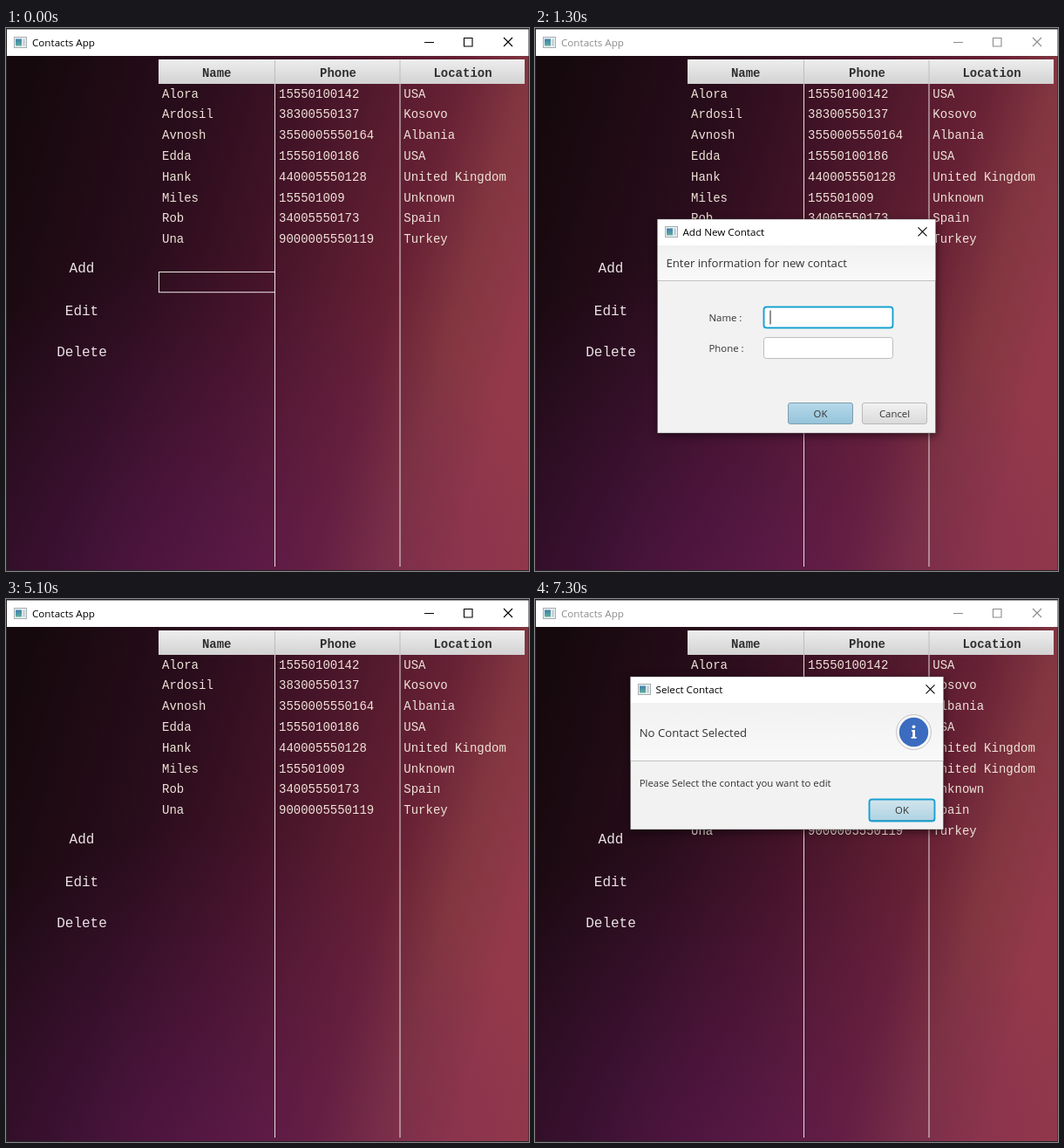
Recreate the animation shown at these times as an HTML page. Size 600 by 622 pixels, loop 8 s.

```html
<!DOCTYPE html>
<html lang="en">
<head>
<meta charset="utf-8">
<title>Contacts App</title>
<style>
  html, body { margin: 0; width: 100%; height: 100%; overflow: hidden; background: #222; }
  svg { display: block; width: 600px; height: 622px; }
  text { white-space: pre; }
  .mono { font: 14px "Liberation Mono", monospace; fill: #eee2d8; }
  .head { font-weight: bold; fill: #2f2f2f; text-anchor: middle; }
  .menu { font-size: 16px; fill: #e9e1e4; text-anchor: middle; }
  .ui { font: 11.4px "Open Sans", "Noto Sans", sans-serif; fill: #333; }
  .title { font-size: 11.65px; fill: currentColor; }
  .big { font-size: 13.15px; }
  .mid { text-anchor: middle; }
  .line { fill: none; stroke: currentColor; stroke-width: 1.1; }
  .dialog { color: #000; filter: drop-shadow(1px 3px 5px rgba(0, 0, 0, .5)); }
</style>
</head>
<body>
<svg id="stage" viewBox="0 0 600 622" xmlns="http://www.w3.org/2000/svg"></svg>
<script>
const LOOP = 8000;
const ROW = 23.83;
const NEW_NAME = "Fiona", NEW_PHONE = "440005550191";

const contacts = [
  ["Alora", "15550100142", "USA"],
  ["Ardosil", "38300550137", "Kosovo"],
  ["Avnosh", "3550005550164", "Albania"],
  ["Edda", "15550100186", "USA"],
  ["Hank", "440005550128", "United Kingdom"],
  ["Miles", "155501009", "Unknown"],
  ["Rob", "34005550173", "Spain"],
  ["Una", "9000005550119", "Turkey"]
];
const extended = [...contacts];
extended.splice(4, 0, [NEW_NAME, NEW_PHONE, "United Kingdom"]);

const text = (x, y, cls, content, id = "") =>
  `<text x="${x}" y="${y}" class="${cls}" id="${id}">${content}</text>`;
const rect = (x, y, w, h, attrs) =>
  `<rect x="${x}" y="${y}" width="${w}" height="${h}" ${attrs}/>`;
const gradient = (id, stops, attrs = 'x2="0" y2="1"') =>
  `<linearGradient id="${id}" ${attrs}>${stops.map(([o, c]) =>
    `<stop offset="${o}" stop-color="${c}"/>`).join("")}</linearGradient>`;

const windowIcon = (x, y) => `<g transform="translate(${x} ${y})">
  ${rect(.5, .5, 14, 12, 'fill="#eef2f3" stroke="#a3adb2"')}
  ${rect(2, 2.5, 7, 8, 'fill="url(#iconFill)"')}
  ${rect(10, 2.5, 3, 8, 'fill="#c9d3d8"')}</g>`;

const cross = (x, y) => `<path class="line" d="M${x - 5} ${y - 5}l10 10m0 -10l-10 10"/>`;

const table = rows => rows.map((row, i) =>
  row.map((cell, c) => text([179, 313, 456.3][c], 79.5 + ROW * i, "mono", cell)).join("")).join("");

const button = (x, y, w, label, fill, stroke) =>
  rect(x + .5, y + .5, w - 1, 24, `rx="2.5" fill="url(#${fill})" stroke="${stroke}"`) +
  text(x + w / 2, y + 17, "ui mid", label);

const ring = (id, x, y, w, h) =>
  `<g id="${id}" fill="none">${rect(x - .5, y - .5, w + 1, h + 1, 'rx="4" stroke="#9fd6ec" stroke-opacity=".6"')}
  ${rect(x + .6, y + .6, w - 1.2, h - 1.2, 'rx="3" stroke="#12a0d0" stroke-width="1.7"')}</g>`;

const field = (name, y) =>
  rect(262.5, y + .5, 148, 24, 'rx="3" fill="#fff" stroke="#bcbcbc"') +
  ring(name + "Ring", 262, y, 149, 25) +
  text(270, y + 17, "ui", "", name + "Text") +
  rect(269.5, y + 4.5, 1, 16, `id="${name}Caret" fill="#222"`);

const dialog = (id, x, y, w, h, headHeight, title, content) => `<g id="${id}" class="dialog">
  ${rect(x, y, w, h, 'fill="#f2f2f2"')}
  ${rect(x, y, w, 30, 'fill="#fff"')}
  ${rect(x, y + 30, w, headHeight, 'fill="url(#panel)"')}
  ${rect(x, y + 30 + headHeight, w, 1, 'fill="#c2c2c2"')}
  ${rect(x, y, w, h, 'fill="none" stroke="#555" stroke-opacity=".5" stroke-width=".8"')}
  ${windowIcon(x + 8.5, y + 8)}${text(x + 29, y + 19, "ui title", title)}
  ${cross(x + w - 15, y + 14.3)}${content}</g>`;

const stage = document.getElementById("stage");
stage.innerHTML = `<defs>
  ${gradient("wall", [[0, "#16090d"], [.3, "#2a0d1c"], [.5, "#431327"], [.75, "#672135"],
    [.87, "#823640"], [1, "#94394a"]], 'gradientUnits="userSpaceOnUse" x1="0" y1="150" x2="600" y2="330"')}
  <radialGradient id="glow" gradientUnits="userSpaceOnUse" cx="230" cy="680" r="420">
    <stop offset="0" stop-color="#5f195f" stop-opacity=".55"/>
    <stop offset="1" stop-color="#5f195f" stop-opacity="0"/>
  </radialGradient>
  ${gradient("header", [[0, "#eeeeee"], [1, "#d2d2d2"]])}
  ${gradient("panel", [[0, "#f1f1f1"], [1, "#f9f9f9"]])}
  ${gradient("plain", [[0, "#f2f2f2"], [1, "#dadada"]])}
  ${gradient("primary", [[0, "#b5d9ea"], [1, "#96c3d9"]])}
  ${gradient("focused", [[0, "#d3e5ec"], [1, "#afd3e3"]])}
  ${gradient("iconFill", [[0, "#3f7fae"], [1, "#5fae9c"]])}
</defs>
${rect(0, 0, 600, 622, 'fill="#262226"')}
${rect(1, 32, 598.5, 589, 'fill="url(#wall)"')}
${rect(1, 32, 598.5, 589, 'fill="url(#glow)"')}
<g id="titleBar">
  ${rect(1, 1.5, 598.5, 30.5, 'fill="#fff"')}
  ${windowIcon(9, 10)}${text(30, 21, "ui title", "Contacts App")}
  <path class="line" d="M480 16.5h11M525.5 11.5h9.5v9.5h-9.5z"/>${cross(576, 16)}
</g>
${["Add", "Edit", "Delete"].map((label, i) => text(87, [279.5, 328.5, 375.5][i], "mono menu", label)).join("")}
${rect(175, 36, 420, 28, 'fill="url(#header)"')}
${["Name", "Phone", "Location"].map((label, i) => text([241.7, 381, 524][i], 55.5, "mono head", label)).join("")}
${[308, 451.5].map(x => rect(x, 37, 1, 27, 'fill="#bdbdbd"') + rect(x, 64, 1, 553, 'fill="#e6dde0"')).join("")}
<g id="rowsBefore">${table(contacts)}</g>
<g id="rowsAfter">${table(extended)}</g>
${rect(175.5, 0, 133, 23.2, 'id="rowFocus" fill="none" stroke="#efe9eb"')}
${dialog("addDialog", 140.5, 219, 319, 245, 40, "Add New Contact",
  text(150.5, 274, "ui big", "Enter information for new contact") +
  text(199.5, 336, "ui", "Name :") + text(199.5, 371, "ui", "Phone :") +
  field("name", 319) + field("phone", 354) +
  button(290, 429, 75, "OK", "primary", "#7d9fae") + ring("okRing", 290, 429, 75, 25) +
  button(375, 429, 75, "Cancel", "plain", "#b9b9b9"))}
${dialog("infoDialog", 109.5, 89, 359, 175, 66, "Select Contact",
  text(119.7, 158, "ui big", "No Contact Selected") +
  text(119.7, 215, "ui", "Please Select the contact you want to edit") +
  `<circle cx="434.5" cy="152.5" r="20" fill="#f7f7f7" stroke="#c4c4c4"/>
   <circle cx="434.5" cy="152.5" r="16.7" fill="#3b6cbf"/>
   <circle cx="434.5" cy="146.3" r="1.9" fill="#fff"/>
   <path d="M432 150h4v8h1.6v1.8h-6v-1.8h1.6v-6.2h-1.2z" fill="#fff"/>` +
  button(383, 229, 76, "OK", "focused", "#7d9fae") + ring("infoRing", 383, 229, 76, 26))}`;

const el = id => document.getElementById(id);
const show = (id, on) => el(id).setAttribute("visibility", on ? "inherit" : "hidden");
const between = (t, from, to) => t >= from && t < to;
const clamp = v => Math.min(1, Math.max(0, v));

function fade(id, amount, cx, cy) {
  const scale = 1 - .045 * (1 - amount);
  const node = el(id);
  node.setAttribute("opacity", amount);
  node.setAttribute("visibility", amount > 0 ? "visible" : "hidden");
  node.setAttribute("transform", `translate(${cx} ${cy}) scale(${scale}) translate(${-cx} ${-cy})`);
}

function setField(name, value, focused, caret) {
  const label = el(name + "Text");
  label.textContent = value;
  show(name + "Ring", focused);
  show(name + "Caret", focused && caret);
  el(name + "Caret").setAttribute("x", 269.5 + (value ? label.getComputedTextLength() : 0));
}

const keyTimes = [2000, 2200, 2300, 2500, 2600];

function render(t) {
  const inactive = between(t, 600, 5100) || t >= 6500;
  el("titleBar").setAttribute("color", inactive ? "#8c8c8c" : "#000");

  show("rowsBefore", t < 5200);
  show("rowsAfter", t >= 5200);

  const focusRow = t < 100 ? 9 : between(t, 5400, 5900) ? 15 : between(t, 5900, 6100) ? 12 : -1;
  show("rowFocus", focusRow >= 0);
  el("rowFocus").setAttribute("y", 279.5 + (focusRow - 9) * ROW);

  fade("addDialog", clamp((t - 605) / 225) * clamp((4850 - t) / 250), 300, 341.5);
  fade("infoDialog", clamp((t - 6490) / 225), 289, 176.5);

  const typed = keyTimes.filter(k => t >= k).length;
  show("okRing", t < 1300);
  setField("name", NEW_NAME.slice(0, typed), between(t, 1300, 2900), !between(t, 1800, 2000));
  setField("phone", t >= 3600 ? NEW_PHONE : "", t >= 2900, !between(t, 3400, 3600) && t < 4100);
}

const start = performance.now();
function tick() {
  render((performance.now() - start) % LOOP);
  requestAnimationFrame(tick);
}
tick();
</script>
</body>
</html>
```
